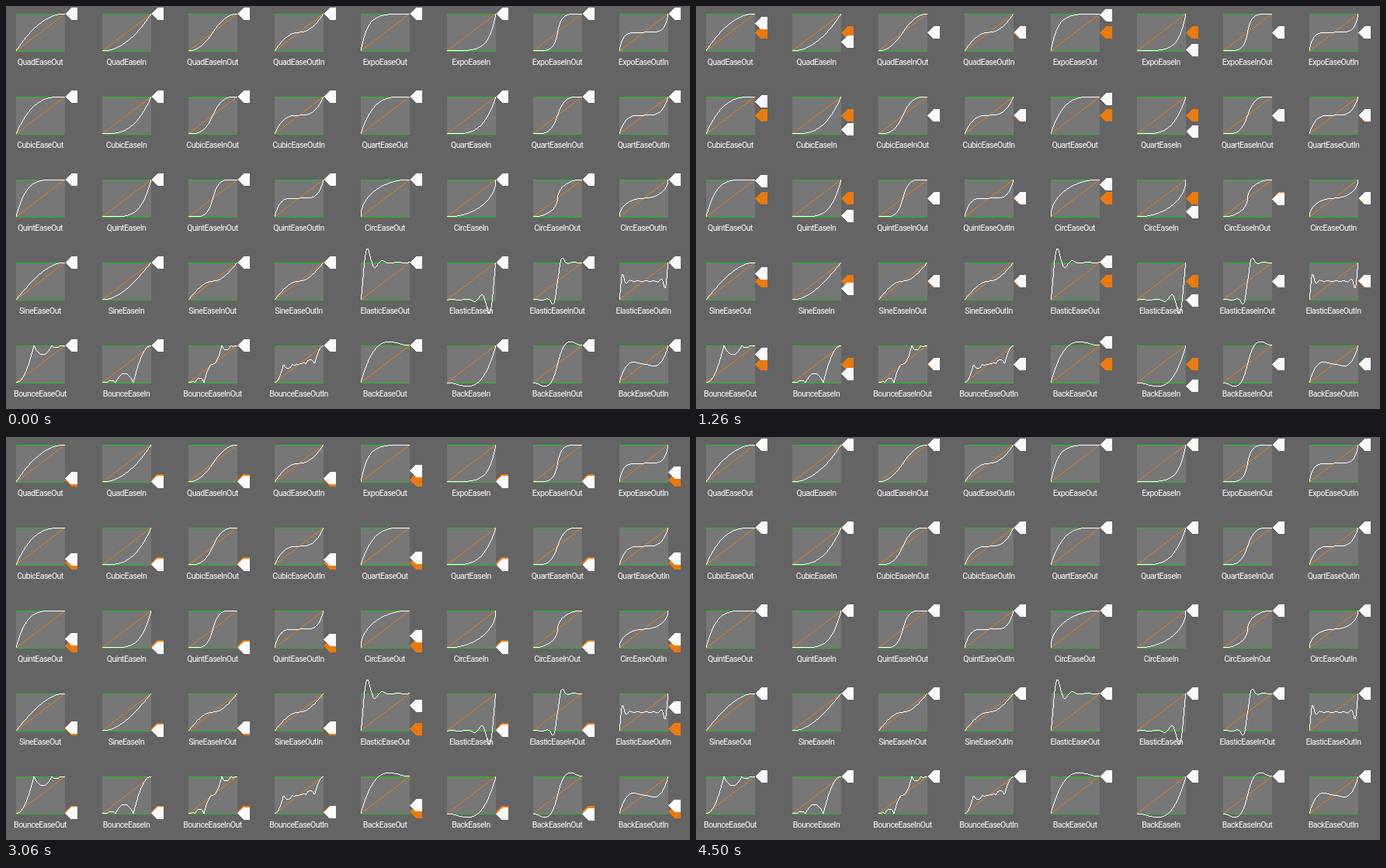
An HTML page for the animation above (5220 ms loop, 881 by 520 pixels).

```html
<!DOCTYPE html>
<html lang="en">
<head>
<meta charset="utf-8">
<title>Easing curves</title>
<style>
  html, body { margin: 0; width: 100%; height: 100%; overflow: hidden; background: #646464; }
  svg { display: block; width: 881px; height: 520px; }
  text { font: 10.5px Roboto, sans-serif; letter-spacing: -.5px; fill: #fff; text-anchor: middle; }
  rect, path { shape-rendering: crispEdges; }
  .box { fill: #777; }
  .edge { fill: #20be20; }
  .line { fill: #ea7d0e; }
  .curve { fill: #fff; }
  .linear { fill: #ea7a0e; }
  .eased { fill: #fafafa; }
</style>
</head>
<body>
<svg id="stage" viewBox="0 0 881 520"></svg>
<script>
const W = 63, H = 48, LOOP = 5220, STEP = 60;

const mirror = f => t => 1 - f(1 - t);
const halves = (a, b) => t => t < .5 ? a(2 * t) / 2 : .5 + b(2 * t - 1) / 2;
const power = n => t => t ** n;
const back = s => t => t * t * ((s + 1) * t - s);
const elastic = p => t => t <= 0 ? 0 : t >= 1 ? 1 :
  -(2 ** (10 * (t - 1))) * Math.sin((t - 1 - p / 4) * 2 * Math.PI / p);

function bounceOut(t) {
  const k = 7.5625, d = 2.75;
  if (t < 1 / d) return k * t * t;
  if (t < 2 / d) return k * (t - 1.5 / d) ** 2 + .75;
  if (t < 2.5 / d) return k * (t - 2.25 / d) ** 2 + .9375;
  return k * (t - 2.625 / d) ** 2 + .984375;
}

// "inner" replaces the ease-in used by the InOut variant.
function family(easeIn, inner = easeIn) {
  const easeOut = mirror(easeIn);
  return {
    Out: easeOut,
    In: easeIn,
    InOut: halves(inner, mirror(inner)),
    OutIn: halves(easeOut, easeIn)
  };
}

const sine = family(t => 1 - Math.cos(t * Math.PI / 2));
sine.InOut = sine.OutIn;

const rows = [
  { Quad: family(power(2)), Expo: family(t => t <= 0 ? 0 : 2 ** (10 * (t - 1))) },
  { Cubic: family(power(3)), Quart: family(power(4)) },
  { Quint: family(power(5)), Circ: family(t => 1 - Math.sqrt(1 - t * t)) },
  { Sine: sine, Elastic: family(elastic(.3), elastic(.45)) },
  { Bounce: family(mirror(bounceOut)), Back: family(back(1.70158), back(1.70158 * 1.525)) }
];

const stage = document.getElementById('stage');

function add(tag, attrs) {
  const node = document.createElementNS('http://www.w3.org/2000/svg', tag);
  for (const name in attrs) node.setAttribute(name, attrs[name]);
  return stage.appendChild(node);
}

const rect = (cls, x, y, height) => add('rect', { class: cls, x, y, width: W, height });
const marker = cls => add('path', { class: cls, d: 'M0 0L8-8H16V8H8Z' });
const pixel = (x, y) => `M${x} ${y}h1v1h-1z`;

// One pixel per step along the longer axis, without smoothing.
function segment(a, b) {
  const main = Math.abs(b[0] - a[0]) >= Math.abs(b[1] - a[1]) ? 0 : 1, side = 1 - main;
  const [from, to] = a[main] < b[main] ? [a, b] : [b, a];
  const slope = (to[side] - from[side]) / (to[main] - from[main]);
  let d = '';
  for (let m = Math.ceil(from[main] - .5); m + .5 < to[main]; m++) {
    const s = Math.floor(from[side] + slope * (m + .5 - from[main]));
    d += main ? pixel(s, m) : pixel(m, s);
  }
  return d;
}

function plot(cls, x, y, ease, steps) {
  const point = i => [x + W * i / steps, y + H * (1 - ease(i / steps))];
  let d = '';
  for (let i = 0; i < steps; i++) d += segment(point(i), point(i + 1));
  add('path', { class: cls, d });
}

function cell(name, ease, x, y) {
  rect('box', x, y, H);
  rect('edge', x, y, 1);
  rect('edge', x, y + H, 1);
  add('text', { x: x + 31, y: y + 66 }).textContent = name;
  plot('line', x, y, t => t, 1);
  plot('curve', x, y, ease, W);
  return { ease, x: x + W, y, linear: marker('linear'), eased: marker('eased') };
}

const cells = [];
rows.forEach((row, r) => {
  let col = 0;
  for (const [name, eases] of Object.entries(row))
    for (const [kind, ease] of Object.entries(eases))
      cells.push(cell(`${name}Ease${kind}`, ease, 13 + 111 * col++, 10 + 107 * r));
});

// Time in ms and the linear value reached there.
const track = [
  [0, 1], [540, 1], [960, .707], [1560, .292], [2085, 0],
  [3000, 0], [3060, .0515], [3900, .614], [4476, 1], [LOOP, 1]
];

function valueAt(time) {
  const i = track.findIndex(key => key[0] > time);
  const [t0, v0] = track[i - 1], [t1, v1] = track[i];
  return v0 + (v1 - v0) * (time - t0) / (t1 - t0);
}

function place(node, c, v) {
  node.setAttribute('transform', `translate(${c.x} ${(c.y + H * (1 - v)).toFixed(2)})`);
}

function draw() {
  const time = Math.floor(performance.now() % LOOP / STEP) * STEP;
  const t = valueAt(time);
  for (const c of cells) {
    place(c.linear, c, t);
    place(c.eased, c, c.ease(t));
  }
  requestAnimationFrame(draw);
}
draw();
</script>
</body>
</html>
```
